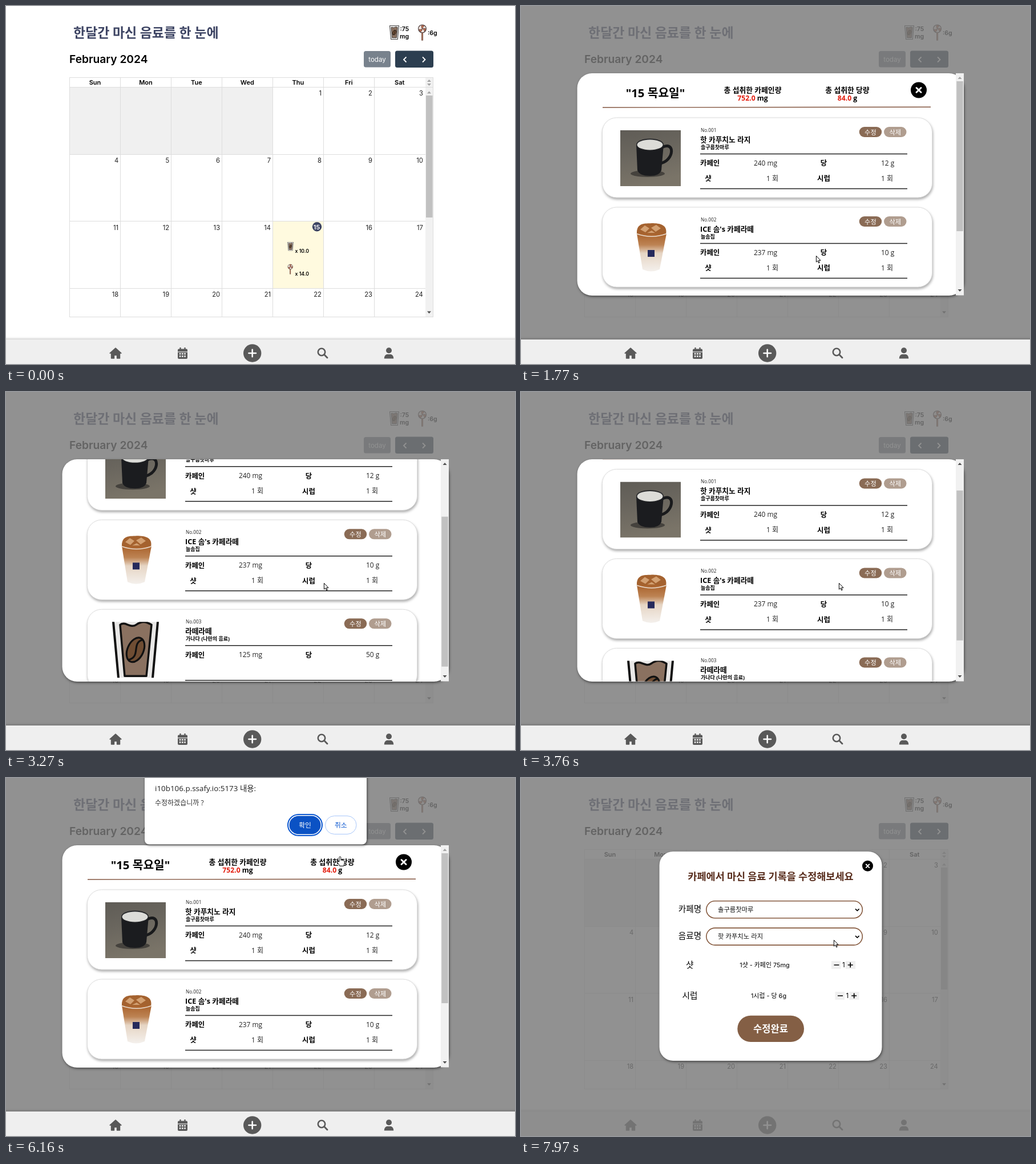
An HTML page that plays this animation: 892 by 628 pixels, repeating every 8000 ms.

```html
<!DOCTYPE html>
<html lang="ko">
<head>
<meta charset="utf-8">
<title>Drink calendar</title>
<style>
html, body { margin: 0; width: 100%; height: 100%; overflow: hidden; background: #fff; }
svg { display: block; width: 892px; height: 628px; }
text { white-space: pre; }
.ui { font-family: Inter, "Noto Sans CJK KR", "Noto Sans KR", sans-serif; }
.sys { font-family: "Open Sans", "Noto Sans CJK KR", "Noto Sans KR", sans-serif; }
.card { filter: drop-shadow(1px 3px 2px rgba(0,0,0,.32)); }
.panel { filter: drop-shadow(1px 2px 2px rgba(0,0,0,.5)); }
.nav { filter: drop-shadow(0 -1px 2px rgba(0,0,0,.25)); }
</style>
</head>
<body>
<svg id="stage" viewBox="0 0 892 628" xmlns="http://www.w3.org/2000/svg">
  <defs>
    <clipPath id="view"><rect x="98" y="118" width="664" height="389.5"/></clipPath>
    <clipPath id="photo"><rect x="174" y="218" width="106" height="98"/></clipPath>
    <linearGradient id="table" x1="0" y1="0" x2=".25" y2="1">
      <stop offset="0" stop-color="#5f5c56"/><stop offset=".45" stop-color="#6a665e"/><stop offset="1" stop-color="#7a7468"/>
    </linearGradient>
    <linearGradient id="latte" x1="0" y1="0" x2="0" y2="1">
      <stop offset="0" stop-color="#a9622c"/><stop offset=".3" stop-color="#bd8353"/>
      <stop offset=".52" stop-color="#e6d5c4"/><stop offset="1" stop-color="#f4f0ec"/>
    </linearGradient>
    <symbol id="cup" viewBox="0 0 84 124">
      <path d="M2 2H82L71 122H13Z" fill="#e9e8e7" stroke="#111" stroke-width="4" stroke-linejoin="round"/>
      <path d="M15 18C24 11 33 25 43 18S60 12 70 18L61 108H23Z" fill="#8a7160" stroke="#111" stroke-width="3.5" stroke-linejoin="round"/>
      <g transform="rotate(24 42 62)" fill="#6f4d33" stroke="#111" stroke-width="3.2">
        <ellipse cx="42" cy="62" rx="14" ry="22.5"/>
        <path d="M46 41C30 54 56 69 38 83" fill="none"/>
      </g>
    </symbol>
    <symbol id="candy" viewBox="0 0 16 30">
      <path d="M8 14V29" stroke="#5a3a30" stroke-width="3"/><path d="M8 14V28.5" stroke="#c98d73" stroke-width="1.4"/>
      <circle cx="8" cy="8" r="7" fill="#f3e9e3" stroke="#4a3a38" stroke-width="1.2"/>
      <path d="M8 8Q5 5 7 1.5Q11 1 11.5 3Q9 5 8 8Q12 6 14.5 8Q14 12 12 13Q11 9 8 8Q8 12 5 14Q2 12 2 9Q5 10 8 8" fill="#b5694f" stroke="#4a3a38" stroke-width=".6"/>
    </symbol>
  </defs>
</svg>
<script>
const LOOP = 8000, stage = document.getElementById('stage');

const rect = (x, y, w, h, fill, extra = '') =>
  `<rect x="${x}" y="${y}" width="${w}" height="${h}" fill="${fill}" ${extra}/>`;
const path = (d, stroke, width = 1, extra = '') =>
  `<path d="${d}" fill="none" stroke="${stroke}" stroke-width="${width}" ${extra}/>`;
const shape = (d, fill) => `<path d="${d}" fill="${fill}"/>`;
const circle = (x, y, r, fill) => `<circle cx="${x}" cy="${y}" r="${r}" fill="${fill}"/>`;
const icon = (id, x, y, w, h) => `<use href="#${id}" x="${x}" y="${y}" width="${w}" height="${h}"/>`;
const text = (x, y, s, size, { w = 400, fill = '#000', at = 'start' } = {}) =>
  `<text x="${x}" y="${y}" font-size="${size}" font-weight="${w}" fill="${fill}" text-anchor="${at}">${s}</text>`;
const group = (attrs, body) => `<g ${attrs}>${body}</g>`;
const arrow = (x, y, dir, fill) => shape(`M${x - 3.5} ${y + 2 * dir}h7l-3.5 ${-4 * dir}z`, fill);
const backdrop = height => rect(0, 0, 892, height, '#797979', 'fill-opacity=".82"');
const mid = { at: 'middle' }, bold = { w: 700 }, boldMid = { w: 700, at: 'middle' };

function calendar() {
  const colX = i => 111.5 + 88.95 * i, rowY = i => 142.5 + 117.7 * i;
  const snap = v => Math.floor(v) + .5;
  let s = text(118, 55, '한달간 마신 음료를 한 눈에', 23, { w: 700, fill: '#3d4463' })
    + text(111, 100, 'February 2024', 19.2, { w: 600 })
    + icon('cup', 672, 34, 17, 25) + icon('candy', 721.5, 32, 16, 29.5)
    + text(690.5, 44, ':75', 10.5, { w: 600 }) + text(690, 57, 'mg', 10.5, { w: 600 })
    + text(739, 51, ':6g', 10.5, { w: 600 })
    + rect(627, 79, 47, 28.5, '#78828d', 'rx="3.5"')
    + text(650.5, 97.5, 'today', 11.6, { fill: '#fff', at: 'middle' })
    + rect(682, 78.5, 67, 29.5, '#2c3e50', 'rx="3.5"')
    + path('M701.5 89.5l-4.5 4.5 4.5 4.5M730 89.5l4.5 4.5-4.5 4.5', '#fff', 1.8)
    + rect(111.5, 142.5, 356, 118, '#f0f0f0') + rect(467.5, 378, 88.5, 117.5, '#fffadf')
    + rect(735, 125, 14, 421, '#f1f1f1') + rect(736, 157, 11.5, 214, '#c1c1c1')
    + arrow(741.5, 131, 1, '#a3a3a3') + arrow(741.5, 138, -1, '#a3a3a3')
    + arrow(741.5, 151.5, 1, '#a3a3a3') + arrow(741.5, 537.5, -1, '#505050');
  let lines = 'M111.5 125.5H749M111.5 142.5H749M111.5 545.5H749M748.5 125V546';
  for (let i = 0; i < 7; i++) lines += `M${snap(colX(i))} 125V546`;
  for (let i = 1; i < 4; i++) lines += `M111 ${snap(rowY(i))}H735`;
  s += path(lines, '#ddd');
  ['Sun', 'Mon', 'Tue', 'Wed', 'Thu', 'Fri', 'Sat'].forEach((d, i) =>
    s += text(colX(i) + 44.5, 138, d, 11, { w: 600, at: 'middle' }));
  for (let d = 1; d <= 24; d++) {
    const n = d + 3, row = Math.floor(n / 7);
    if (d !== 15) s += text(colX(n % 7 + 1) - 3.3, 157.3 + 117.6 * row, d, 11.2, { fill: '#222', at: 'end' });
  }
  return s + circle(545, 387.3, 8.2, '#3d4463') + text(544.5, 391.6, '15', 11, { w: 600, fill: '#fff', at: 'middle' })
    + icon('cup', 493, 414, 11, 15.5) + text(506.5, 433.3, 'x 10.0', 8.7, { w: 600 })
    + icon('candy', 493.2, 452.5, 10, 18.5) + text(506.5, 473.3, 'x 14.0', 8.7, { w: 600 });
}

function hoverLink() {
  return path('M505 434.5H531.5M505 474.5H531.5', '#000') + path('M538.5 393.5H550.5', '#fff');
}

function tooltip() {
  return rect(526.5, 451.5, 129, 22, '#fff', 'stroke="#767676"')
    + text(532, 467, 'Go to February 15, 2024', 10.5, { fill: '#444' });
}

function closeButton(x, y, r) {
  const k = r * .29;
  return circle(x, y, r, '#000')
    + path(`M${x - k} ${y - k}l${2 * k} ${2 * k}M${x + k} ${y - k}l${-2 * k} ${2 * k}`, '#fff', r * .2, 'stroke-linecap="round"');
}

function mugPhoto() {
  return rect(174, 218, 106, 98, 'url(#table)')
    + '<ellipse cx="222" cy="294" rx="30" ry="6" fill="#45423d"/>'
    + path('M247 248C270 236 269 270 245 276', '#191a1c', 5)
    + shape('M202 243L204 288Q207 298 226 298Q243 298 246 288L250 243Z', '#1b1c1f')
    + '<ellipse cx="226" cy="243" rx="24" ry="10.5" fill="#2a2b2d"/><ellipse cx="226" cy="243.5" rx="22.5" ry="9" fill="#dcdcd8"/>';
}

function lattePhoto() {
  return shape('M203 243C202 222 218 225 229 224C246 224 257 228 254 243Z', '#a4622f')
    + shape('M209 235l8-7 8 5-7 7zM228 232l9-5 8 6-9 6zM221 241l8-4 6 4z', '#d3a173')
    + shape('M203 242L213 305Q228 312 243 305L255 242Z', 'url(#latte)')
    + path('M202.5 242.5Q229 252 255 242.5', '#e9dccf', 1.6)
    + rect(222, 271, 12, 12, '#262a5c');
}

function cardBody({ no, name, shop, caffeine, sugar, photo, extras }) {
  const pill = (x, label, fill) => rect(x, 212, 39.5, 18, fill, 'rx="9"')
    + text(x + 19.7, 225.5, label, 11.2, { w: 500, fill: '#fff', at: 'middle' });
  let s = rect(142.5, 196, 578, 140, '#fff', 'rx="25" stroke="#ddd" class="card"')
    + group('clip-path="url(#photo)"', photo)
    + text(315, 221, no, 8.2, { fill: '#222' }) + text(314, 238.6, name, 12.7, bold) + text(315, 251, shop, 9, bold)
    + pill(592.7, '수정', '#8a6b55') + pill(636, '삭제', '#b09d8f')
    + path('M314 259.5H677M314 320.5H677', '#222', 1.4)
    + text(314, 280.2, '카페인', 12.4, bold) + text(408, 279.8, caffeine + ' mg', 11.9, { fill: '#222' })
    + text(530.5, 280.2, '당', 12.4, boldMid) + text(631, 279.8, sugar + ' g', 11.9, { fill: '#222' });
  if (extras) s += text(328, 307.3, '샷', 12.4, boldMid) + text(430, 307, '1 회', 12, { fill: '#222' })
    + text(530.5, 307.3, '시럽', 12.4, boldMid) + text(631, 307, '1 회', 12, { fill: '#222' });
  return s;
}

const SHOP = '솔구름찻마루', DRINK = '핫 카푸치노 라지';
const drinks = [
  { no: 'No.001', name: DRINK, shop: SHOP, caffeine: 240, sugar: 12, photo: mugPhoto(), extras: true },
  { no: 'No.002', name: "ICE 솜's 카페라떼", shop: '늘솜집', caffeine: 237, sugar: 10, photo: lattePhoto(), extras: true },
  { no: 'No.003', name: '라떼라떼', shop: '가나다 (나만의 음료)', caffeine: 125, sugar: 50, photo: icon('cup', 185, 205, 84, 124) }
];

function dayPanel() {
  const red = s => `<tspan fill="#e31b0c">${s}</tspan>`;
  const head = text(235.5, 160, '"15 목요일"', 20.3, boldMid)
    + text(406, 151.5, '총 섭취한 카페인량', 12.8, boldMid) + text(406, 165.8, red('752.0') + ' mg', 12.2, boldMid)
    + text(572, 151.5, '총 섭취한 당량', 12.8, boldMid) + text(572, 165.8, red('84.0') + ' g', 12.2, boldMid)
    + closeButton(697, 147.5, 14) + path('M143 178L718 177.3', '#80523c', 1.4);
  const cards = drinks.map((d, i) => group(`transform="translate(0 ${157 * i})"`, cardBody(d))).join('');
  return backdrop(585)
    + rect(98.5, 118, 677.5, 390, '#fff', 'rx="26" class="panel"')
    + group('clip-path="url(#view)"', group('id="list"', head + cards))
    + rect(762, 118, 14, 389.5, '#f1f1f1') + rect(763.3, 132, 11.5, 263, '#c1c1c1', 'id="thumb"')
    + group('id="upArrow"', arrow(769, 126, 1, 'currentColor'))
    + group('id="downArrow"', arrow(769, 499, -1, 'currentColor'));
}

function navBar() {
  const c = '#595959';
  let dots = '';
  for (let i = 0; i < 6; i++) dots += rect(303.8 + 4.2 * (i % 3), 608.8 + 4.4 * Math.floor(i / 3), 2.6, 2.6, '#efefef');
  return rect(-5, 585, 902, 50, '#efefef', 'class="nav"')
    + `<path d="M182 609L192 600L202 609H199.5V618H194.5V612.5H189.5V618H184.5V609Z" fill="${c}" stroke="${c}" stroke-width="1.4" stroke-linejoin="round"/>`
    + rect(301, 601.5, 17, 17.5, c, 'rx="2"') + path('M305.5 599V604M313.5 599V604', c, 2.2)
    + path('M301 606.8H318', '#efefef', 1.1) + dots
    + circle(431.7, 609, 15.7, c) + path('M425.5 609H438M431.7 602.8V615.2', '#fff', 2.6, 'stroke-linecap="round"')
    + `<circle cx="553" cy="607" r="6.2" fill="none" stroke="${c}" stroke-width="2.6"/>`
    + path('M557.6 611.6L563 617', c, 2.8, 'stroke-linecap="round"')
    + circle(671, 604.3, 5, c) + shape('M662.8 618.5c0-5 2.6-7.5 6-7.5h4.4c3.4 0 6 2.5 6 7.5z', c);
}

function editPanel() {
  const select = (y, label, value) => text(296, y + 19.5, label, 14.6, mid)
    + rect(324.8, y + .8, 273.5, 30, '#fff', 'rx="15" stroke="#85593e" stroke-width="1.6"')
    + text(345, y + 19.7, value, 11.3, { fill: '#111' })
    + path(`M586 ${y + 14.6}l3.3 3.2 3.3-3.2`, '#000', 1.7);
  const stepper = (x, y) => rect(x, y - 7, 16.5, 14, '#f0f0f0') + rect(x + 25, y - 7, 17, 14, '#f0f0f0')
    + path(`M${x + 4.5} ${y}h9M${x + 28.7} ${y}h9M${x + 33.2} ${y - 4.5}v9`, '#000', 1.7)
    + text(x + 21.3, y + 4.2, '1', 11.5, mid);
  return backdrop(628)
    + rect(242.5, 129, 390, 367, '#fff', 'rx="24" class="panel"')
    + closeButton(607.5, 154.3, 9.5)
    + text(437.5, 179, '카페에서 마신 음료 기록을 수정해보세요', 17.5, { w: 700, fill: '#582d1d', at: 'middle' })
    + select(215, '카페명', SHOP) + select(262.3, '음료명', DRINK)
    + text(295.7, 333.3, '샷', 14.6, mid) + text(427, 332.3, '1샷 - 카페인 75mg', 10.9, mid) + stepper(544, 328)
    + text(296, 387, '시럽', 14.6, mid) + text(434, 386.3, '1시럽 - 당 6g', 10.9, mid) + stepper(550.5, 382)
    + rect(379.3, 416.7, 116.7, 46.3, '#845f45', 'rx="23.1"')
    + text(437.5, 446, '수정완료', 16.6, { w: 700, fill: '#fff', at: 'middle' });
}

function confirmBox() {
  return rect(243, -20, 389, 136.5, '#fff', 'rx="8" class="panel"')
    + text(261, 23, 'i10b106.p.ssafy.io:5173 내용:', 13.4, { fill: '#222' })
    + text(261, 48, '수정하겠습니까 ?', 12, { fill: '#333' })
    + rect(494, 64, 60, 37, '#fff', 'rx="18.5" stroke="#0b57d0" stroke-width="2"')
    + rect(496.5, 66.5, 55, 32, '#0b52c4', 'rx="16" id="okButton"')
    + text(524, 86.7, '확인', 11.8, { fill: '#fff', at: 'middle' })
    + rect(559.5, 66.5, 54.5, 32, '#fff', 'rx="16" stroke="#a8c7fa"')
    + text(586.8, 86.7, '취소', 11.8, { fill: '#0b57d0', at: 'middle' });
}

function pointer() {
  const ink = 'fill="#fff" stroke="#000" stroke-width="1" stroke-linejoin="round"';
  return '<circle id="flash" cx=".5" cy="1.5" r="9.7" fill="#ffee00" fill-opacity=".72"/>'
    + `<path id="arrowShape" ${ink} d="M.4 .4V11.2L2.8 8.9 4.6 12.9 6.2 12.2 4.5 8.3H8z"/>`
    + `<path id="handShape" ${ink} d="M-1.5 9V1.6a1.5 1.5 0 0 1 3 0V6.4a1.3 1.3 0 0 1 2.3.3 1.2 1.2 0 0 1 2.1.6 1.1 1.1 0 0 1 1.9.8V11.5c0 2-1.3 3-1.3 5H-.5C-.8 14.5-3 13-4.6 10.2c-.7-1.4 1-2.4 2-1.2z"/>`;
}

stage.insertAdjacentHTML('beforeend',
  group('class="ui"', calendar() + group('id="link"', hoverLink()))
  + group('id="day" class="sys"', dayPanel())
  + navBar()
  + group('id="tip" class="sys"', tooltip())
  + group('id="edit" class="ui"', editPanel())
  + group('id="confirm" class="sys"', confirmBox())
  + group('id="pointer"', pointer()));

const el = {};
stage.querySelectorAll('[id]').forEach(n => el[n.id] = n);
const show = (name, on) => el[name].setAttribute('visibility', on ? 'visible' : 'hidden');
const within = (t, a, b) => t >= a && t < b;

// time, x, y of the pointer tip
const route = [
  [330, 761, 559], [870, 517, 438], [1900, 517, 438], [2040, 505, 466], [2200, 430, 420], [2320, 363, 361],
  [2390, 372, 397], [2600, 372, 397], [2870, 561, 331], [3070, 561, 331], [3270, 557, 335], [3980, 557, 335],
  [4460, 618, 229], [4530, 617, 229], [5810, 617, 229], [6160, 585.5, 138], [6600, 521, 86], [6930, 521, 86],
  [7250, 562, 190], [7570, 534, 268], [7700, 534, 268], [7970, 548, 284]
];

function pointerAt(t) {
  const i = route.findIndex(p => p[0] > t);
  if (i < 0) return route[route.length - 1].slice(1);
  if (i === 0) return route[0].slice(1);
  const [t0, x0, y0] = route[i - 1], [t1, x1, y1] = route[i];
  const k = (t - t0) / (t1 - t0);
  return [x0 + (x1 - x0) * k, y0 + (y1 - y0) * k];
}

const MAX_SCROLL = 144;
const settle = (t, start) => 1 - Math.pow(1 - Math.min(1, Math.max(0, (t - start) / 460)), 2.84);
const scrollAt = t => MAX_SCROLL * (settle(t, 3020) - settle(t, 3640));

function draw(t) {
  const [x, y] = pointerAt(t), scroll = scrollAt(t);
  const linked = t < 1700 && x < 540;
  const hand = linked || (within(t, 4800, 6720) && y > 116);

  show('link', linked);
  show('tip', within(t, 1010, 1700));
  show('day', within(t, 1700, 6790));
  show('edit', t >= 6790);
  show('confirm', within(t, 5540, 6790));
  el.confirm.setAttribute('opacity', Math.min(1, (Math.max(t, 5540) - 5480) / 190));
  el.okButton.setAttribute('fill', x < 552 && y < 98 ? '#2a68cf' : '#0b52c4');

  el.list.setAttribute('transform', `translate(0 ${-scroll})`);
  el.thumb.setAttribute('y', 132 + scroll * 97 / MAX_SCROLL);
  el.upArrow.setAttribute('color', scroll > .5 ? '#505050' : '#a3a3a3');
  el.downArrow.setAttribute('color', scroll < MAX_SCROLL - .5 ? '#505050' : '#a3a3a3');

  const seen = t >= 330;
  el.pointer.setAttribute('transform', `translate(${x} ${y})`);
  show('arrowShape', seen && !hand);
  show('handShape', seen && hand);
  show('flash', within(t, 1560, 1700) || within(t, 5400, 5540) || within(t, 6720, 6790));
}

const began = performance.now();
function tick() {
  draw((performance.now() - began) % LOOP);
  requestAnimationFrame(tick);
}
tick();
</script>
</body>
</html>
```
